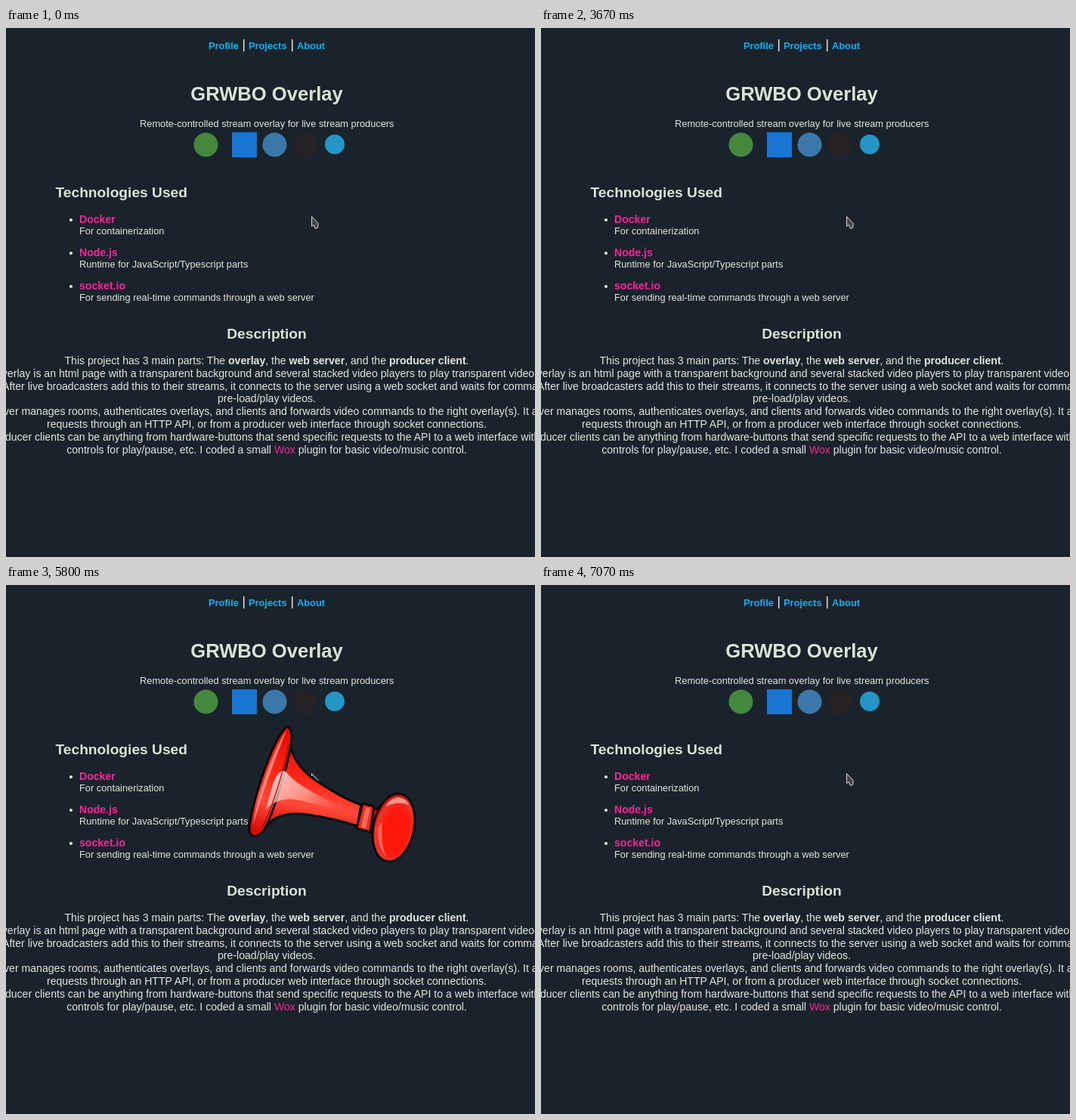
These frames come from a looping animation (700 by 700 pixels, 7.79 s). An HTML page:

```html
<!DOCTYPE html>
<html lang="en">
<head>
<meta charset="utf-8">
<title>Overlay demo</title>
<style>
  html, body { margin: 0; width: 100%; height: 100%; overflow: hidden; background: #1a232b; }
  svg { display: block; width: 100vw; height: 100vh; }
  text { font-family: "Liberation Sans", Arial, sans-serif; fill: #e1e7df; white-space: pre; }
  .mid { text-anchor: middle; }
  .bold { font-weight: bold; }
  .small { font-size: 12.8px; }
  .body { font-size: 14.08px; }
  .h1 { font-size: 25.6px; fill: #d9e3d6; }
  .h2 { font-size: 19.2px; fill: #d9e3d6; }
  .link { fill: #12b2f2; }
  .pink { fill: #fb239f; }
  .query { font-size: 22.4px; fill: #e0e0e0; }
  .ghost { fill: #c3c3c3; }
  .name { font: 500 13.1px "Open Sans", "Noto Sans", sans-serif; fill: #fff; }
  .info { font-size: 9.6px; fill: #dadedb; }
</style>
</head>
<body>
<svg viewBox="0 0 700 700" xmlns="http://www.w3.org/2000/svg">
  <defs>
    <linearGradient id="red" x1="0.6" y1="0" x2="0.4" y2="1">
      <stop offset="0" stop-color="#e80c05"/>
      <stop offset="0.45" stop-color="#ff2a1a"/>
      <stop offset="0.7" stop-color="#ff4a3a"/>
      <stop offset="1" stop-color="#d80a05"/>
    </linearGradient>
    <linearGradient id="shine" x1="0" y1="0.2" x2="1" y2="0.8">
      <stop offset="0" stop-color="#ffe9e6" stop-opacity="0.85"/>
      <stop offset="0.5" stop-color="#ffb4aa" stop-opacity="0.7"/>
      <stop offset="1" stop-color="#ff6a5c" stop-opacity="0.1"/>
    </linearGradient>
    <radialGradient id="ball" cx="0.55" cy="0.55" r="0.55">
      <stop offset="0" stop-color="#ff1408"/>
      <stop offset="0.6" stop-color="#fb1a0d"/>
      <stop offset="0.85" stop-color="#e8382c"/>
      <stop offset="1" stop-color="#b80802"/>
    </radialGradient>
  </defs>

  <rect width="700" height="700" fill="#1a232b"/>

  <g class="bold">
    <text class="small link" x="268" y="28">Profile</text>
    <text class="small link" x="321" y="28">Projects</text>
    <text class="small link" x="385" y="28">About</text>
  </g>
  <path d="M314.7 15V31M378.7 15V31" stroke="#dfe6df" stroke-width="1.5"/>

  <text class="h1 bold mid" x="345" y="96">GRWBO Overlay</text>
  <text class="small mid" x="345.3" y="131">Remote-controlled stream overlay for live stream producers</text>

  <circle cx="264.5" cy="154.5" r="16" fill="#44883e"/>
  <rect x="299" y="138" width="33" height="33" fill="#1976d2"/>
  <circle cx="355.5" cy="154.5" r="16" fill="#3b78a9"/>
  <circle cx="395.5" cy="154.5" r="16" fill="#262224"/>
  <circle cx="435" cy="154" r="13" fill="#2496c6"/>

  <text class="h2 bold" x="65.5" y="224">Technologies Used</text>
  <g id="tech"></g>

  <text class="h2 bold mid" x="345" y="411">Description</text>
  <g class="body">
    <text class="mid" x="345" y="444.8">This project has 3 main parts: The <tspan class="bold">overlay</tspan>, the <tspan class="bold">web server</tspan>, and the <tspan class="bold">producer client</tspan>.</text>
    <text x="-13" y="461.7">overlay is an html page with a transparent background and several stacked video players to play transparent video</text>
    <text x="-5" y="478.5">After live broadcasters add this to their streams, it connects to the server using a web socket and waits for commands</text>
    <text class="mid" x="345" y="495.3">pre-load/play videos.</text>
    <text x="-22.5" y="512.1">server manages rooms, authenticates overlays, and clients and forwards video commands to the right overlay(s). It also</text>
    <text class="mid" x="345" y="529">requests through an HTTP API, or from a producer web interface through socket connections.</text>
    <text x="-23" y="545.8">Producer clients can be anything from hardware-buttons that send specific requests to the API to a web interface with</text>
    <text class="mid" x="345" y="562.6">controls for play/pause, etc. I coded a small <tspan class="pink">Wox</tspan> plugin for basic video/music control.</text>
  </g>

  <g id="launcher">
    <rect id="frame" x="35" y="102" width="641" height="53" fill="#404040"/>
    <rect x="41" y="110" width="629" height="37" fill="#616161"/>
    <text class="query" x="43" y="137"><tspan id="typed"></tspan><tspan id="ghost" class="ghost"></tspan></text>
    <rect id="caret" y="116" width="1" height="26" fill="#e6e6e6"/>
    <g id="results"><rect x="41" y="155" width="629" height="40" fill="#4f6180"/></g>
  </g>

  <path d="M404.5 249.5V262.5L407.2 260.6L409.4 265.5L412.6 264.3L413.2 258.6Z" fill="#454545" stroke="#dcdcdc" stroke-linejoin="round"/>
  <g id="badge">
    <circle cx="418" cy="264.5" r="4.6" fill="#f3ece6" stroke="#35a3b8" stroke-width="1.2"/>
    <circle cx="418" cy="264" r="2.4" fill="#d8623c"/>
  </g>

  <g id="horn" stroke="#0b0505" stroke-width="3" stroke-linejoin="round">
    <path d="M484 297Q491 298 497 291L494 326Q488 320 480 320Z" fill="#e5150b"/>
    <ellipse cx="513" cy="321" rx="27" ry="45.5" transform="rotate(12 513 321)" fill="url(#ball)"/>
    <path d="M376 212C382 240 402 255 428 270Q448 283 470 291L465 319Q435 309 400 304C370 300 352 306 339 326Z" fill="url(#red)"/>
    <path d="M371 289L487 293L481 327L464 323L471 289Z" fill="none" stroke="none"/>
    <path d="M472 289L487 293L482 327L464 322Z" fill="#f5281b"/>
    <path d="M371 188Q378 187 378 203C375 235 351 311 340 326Q333 334 326 332Q320 328 323 314C329 278 353 204 371 188Z" fill="url(#red)"/>
    <g stroke="none">
      <path d="M352 268C357 249 366 242 371 248C384 264 412 279 458 299Q424 295 400 288C378 280 357 282 344 297Z" fill="url(#shine)"/>
      <path d="M371 193C356 213 333 276 327 318Q343 262 371 193Z" fill="#ff9c90" opacity="0.8"/>
      <path d="M476 294L482 296L476 322L470 320Z" fill="#ff8a7c" opacity="0.7"/>
      <path d="M502 293Q509 281 520 281Q530 283 533 291Q520 285 502 293Z" fill="#ffb5aa" opacity="0.75"/>
      <path d="M492 322Q491 348 503 359Q495 340 498 312Z" fill="#ff8577" opacity="0.65"/>
    </g>
    <path d="M374 210C369 242 351 300 338 322" fill="none" stroke="#9c0803" stroke-width="1.2"/>
  </g>
</svg>

<script>
const LOOP = 7790;
const FPS = 15;
const HOME = { x: 432, y: 290 };
const TILT = 18;
const $ = id => document.getElementById(id);
const show = (id, on) => { $(id).style.display = on ? "" : "none"; };
const within = (t, from, to) => t >= from && t < to;
const mix = (a, b, u) => a + (b - a) * u;
const smooth = u => u * u * (3 - 2 * u);

const tech = [
  ["Docker", "For containerization"],
  ["Node.js", "Runtime for JavaScript/Typescript parts"],
  ["socket.io", "For sending real-time commands through a web server"]
];
$("tech").innerHTML = tech.map(([name, use], i) => {
  const y = 258 + 44 * i;
  return `<circle cx="86" cy="${y - 4}" r="2.1" fill="#e1e7df"/>
    <text class="body bold pink" x="97" y="${y}">${name}</text>
    <text class="small" x="97" y="${y + 15}">${use}</text>`;
}).join("");

const clips = [["", 8], ["2", 9], ["1", 8], ["3", 9], ["4", 9], ["5", 9]];
$("results").innerHTML += clips.map(([suffix, size], i) => {
  const y = 155 + 40 * i;
  return `<circle cx="58.5" cy="${y + 19}" r="8" fill="#c5140d"/>
    <text class="name" x="75" y="${y + 20}">clownhorn${suffix}</text>
    <text class="info" x="75" y="${y + 31.5}">start playing to tobelunk (1.${size} MB)</text>`;
}).join("");

// [start time, typed text, results open]
const typing = [
  [470, "", false], [1330, "v", false], [1600, "v ", false], [1870, "v c", false],
  [2000, "v cl", false], [2130, "v clo", false], [2270, "v clo", true],
  [2400, "v clow", false], [2470, "v clow", true],
  [2600, "v clown", false], [2670, "v clown", true]
];

function drawLauncher(t) {
  const open = within(t, 470, 3600);
  show("launcher", open);
  show("badge", within(t, 1400, 2270) || within(t, 3200, 3670));
  if (!open) return;
  const [, text, listed] = typing.filter(s => s[0] <= t).pop();
  $("typed").textContent = text;
  $("ghost").textContent = listed ? "v clownhorn".slice(text.length) : "";
  $("frame").setAttribute("height", listed ? 300 : 53);
  show("results", listed);
  show("caret", !within(t, 1070, 1330) && t < 3070);
  $("caret").setAttribute("x", Math.round(43 + (text ? $("typed").getComputedTextLength() : 0)));
}

// Pose by video tick: fly in spinning, squeeze and stretch, fly out past the viewer.
function hornPose(n) {
  const pose = { ...HOME, turn: 0, size: 1, stretch: 1 };
  if (n <= 88) {
    const u = Math.min(1, (n - 77) / 10);
    const e = 1 - (1 - u) ** 3;
    pose.x = mix(793, HOME.x, e);
    pose.y = mix(409, HOME.y, e);
    pose.turn = 162 * (1 - smooth(u));
    pose.size = 1 + 0.53 * Math.sin(Math.PI * u);
  } else if (n <= 100) {
    const keys = [1, 0.76, 1.72, 1];
    const k = Math.min(2, Math.floor((n - 88) / 4));
    pose.stretch = mix(keys[k], keys[k + 1], smooth((n - 88) / 4 - k));
  } else {
    const u = (n - 100) / 6;
    pose.x += 550 * u * u;
    pose.y += 90 * u;
    pose.size = 1 + 3.5 * u * (2 - u);
  }
  return pose;
}

function drawHorn(t) {
  const n = Math.floor(t * FPS / 1000 + 0.06);
  const on = n >= 77 && n < 106;
  show("horn", on);
  if (!on) return;
  const p = hornPose(n);
  $("horn").setAttribute("transform",
    `translate(${p.x} ${p.y}) rotate(${TILT + p.turn}) scale(${p.size * p.stretch} ${p.size}) ` +
    `rotate(${-TILT}) translate(${-HOME.x} ${-HOME.y})`);
}

const start = performance.now();
function draw() {
  const t = (performance.now() - start) % LOOP;
  drawLauncher(t);
  drawHorn(t);
  requestAnimationFrame(draw);
}
draw();
</script>
</body>
</html>
```
